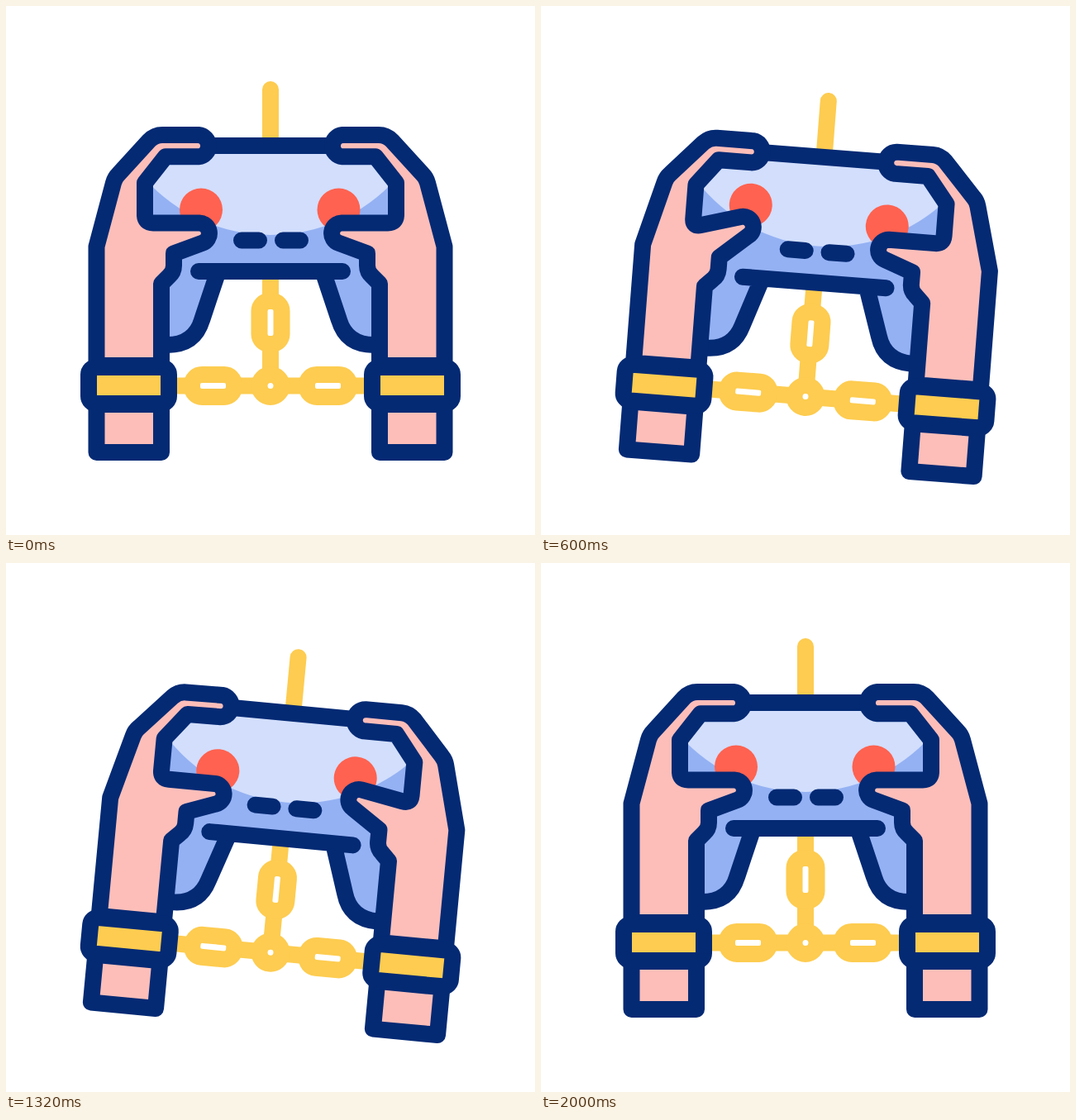
An HTML page for the animation above (2040 ms loop, 640 by 640 pixels).

```html
<!DOCTYPE html>
<html lang="en">
<head>
<meta charset="utf-8">
<title>Chained to the game</title>
<style>
  html, body { margin: 0; width: 100%; height: 100%; overflow: hidden; background: #fff; }
  svg { display: block; width: 100%; height: 100%; }
  .navy, .hand { stroke: #042a74; stroke-width: 20; stroke-linecap: round; stroke-linejoin: round; }
  .chain { fill: none; stroke: #fdcc50; stroke-width: 20; stroke-linecap: round; }
  .hand { fill: #fdbeb9; }
  .button { fill: #ff6250; }
</style>
</head>
<body>
<svg viewBox="0 0 640 640">
  <g id="all">
    <g class="chain">
      <path d="M320 101V165M320 325V350M320 417V440M200 459.5H219M282 459.5H301M339 459.5H358M421 459.5H440"/>
      <rect x="306.5" y="357" width="27" height="52" rx="12"/>
      <rect x="225" y="446" width="51" height="27" rx="12"/>
      <rect x="364" y="446" width="51" height="27" rx="12"/>
      <circle cx="320" cy="459.5" r="13.5"/>
    </g>
    <path fill="#94b1f3" d="M225 169L193 185L168 214V262L203 302V320L188 335V410Q228 410 237 380L255 326H385L403 380Q412 410 452 410V335L437 320V302L472 262V214L447 185L415 169Z"/>
    <path fill="#d2defc" d="M225 169L193 185L168 209A204 204 0 0 0 472 209L447 185L415 169Z"/>
    <circle id="buttonL" class="button" cx="236" cy="246.5" r="26"/>
    <circle id="buttonR" class="button" cx="402.5" cy="246.5" r="26"/>
    <path class="navy" fill="none" d="M230 169H410M233 321H407M285 283.5H306M335 283.5H356M255 326L237 380Q228 410 195 410M385 326L403 380Q412 410 445 410"/>
    <g>
      <path id="handL" class="hand"/>
      <path class="hand" d="M109.5 482H188V540H109.5Z"/>
      <rect class="navy" fill="#fdcc50" x="100" y="437" width="97" height="44" rx="9"/>
    </g>
    <g transform="matrix(-1 0 0 1 640 0)">
      <path id="handR" class="hand"/>
      <path class="hand" d="M109.5 482H188V540H109.5Z"/>
      <rect class="navy" fill="#fdcc50" x="100" y="437" width="97" height="44" rx="9"/>
    </g>
  </g>
</svg>
<script>
const LOOP = 2040, STEP = 40;
const $ = id => document.getElementById(id);

// Eased 0 to 1 between two times
const ease = (t, from, to) => {
  const u = Math.min(1, Math.max(0, (t - from) / (to - from)));
  return u * u * (3 - 2 * u);
};

// Eased rise, hold and fall
const pulse = (t, start, hold = 80, ramp = 160) =>
  ease(t, start, start + ramp) - ease(t, start + ramp + hold, start + 2 * ramp + hold);

// Returns a function that turns points upwards about a joint
const turner = (px, py, degrees) => {
  const a = degrees * Math.PI / 180, c = Math.cos(a), s = Math.sin(a);
  return (x, y) => {
    const dx = x - px, dy = y - py;
    return (px + dx * c + dy * s).toFixed(2) + ' ' + (py - dx * s + dy * c).toFixed(2);
  };
};

// Left hand outline; finger and thumb are lift angles in degrees
function handPath(finger, thumb) {
  const f = turner(170, 175, finger), h = turner(186, 283, thumb);
  const palm = 262.5 + thumb / 6;
  return `M109.5 435V291L130 214Q131.5 208 136 203.5L${f(173, 163)}` +
    `Q${f(180, 156)} ${f(189, 156)}L${f(233, 156)}` +
    `A13.2 13.2 0 0 1 ${f(233, 182.3)}L${f(193, 182.3)}L168 214` +
    `V${palm - 10}Q168 ${palm} 178 ${palm - thumb / 6}L${h(234, 262.5)}` +
    `A12.5 12.5 0 0 1 ${h(237.5, 286.8)}L203 299.5V314Q203 322 197 327L188 336V435Z`;
}

function draw(t) {
  const angle = 6 * (ease(t, 200, 800) - ease(t, 1200, 1800));
  const drop = 13 * (pulse(t, 200, 0, 400) + pulse(t, 1000, 0, 400));
  const thumbL = pulse(t, 440) + pulse(t, 1370);
  const thumbR = pulse(t, 120) + pulse(t, 1000) + pulse(t, 1416);
  const fingerL = pulse(t, 178) + pulse(t, 782, 240);
  const fingerR = pulse(t, 215, 60) + pulse(t, 782, 60);

  $('all').setAttribute('transform', `translate(0 ${drop}) rotate(${angle} 320 459.5)`);
  $('handL').setAttribute('d', handPath(15 * fingerL, 18 * thumbL));
  $('handR').setAttribute('d', handPath(15 * fingerR, 23 * thumbR));
  $('buttonL').setAttribute('cy', 246.5 - 13 * thumbL);
  $('buttonR').setAttribute('cy', 246.5 - 13 * thumbR);
}

const begin = performance.now();
function tick() {
  const t = (performance.now() - begin) % LOOP;
  draw(Math.floor(t / STEP) * STEP);
  requestAnimationFrame(tick);
}
tick();
</script>
</body>
</html>
```
